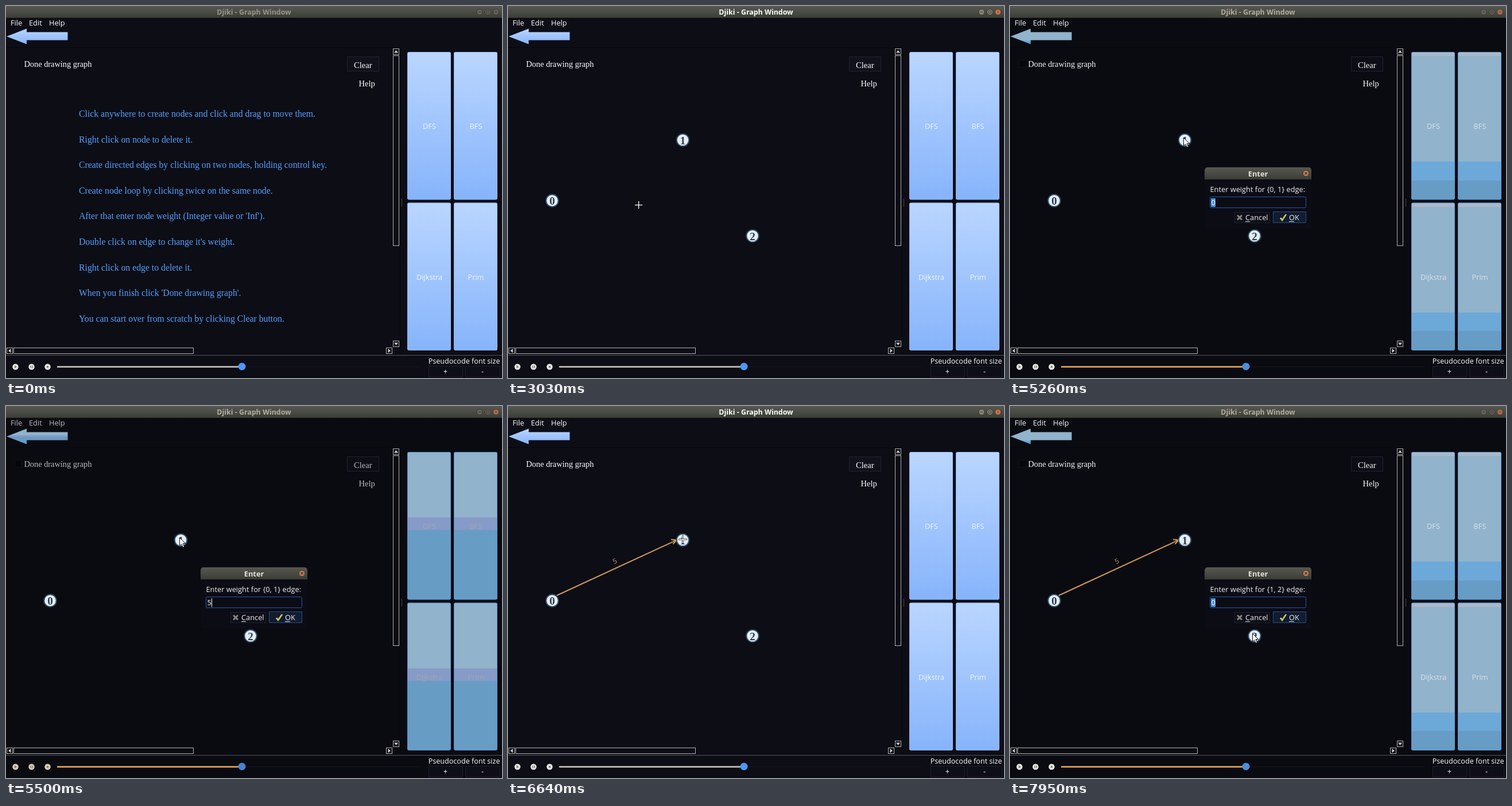
Recreate the animation shown at these times as an HTML page with a canvas. Size 864 by 648 pixels, loop 8 s.

```html
<!DOCTYPE html>
<html lang="en">
<head>
<meta charset="utf-8">
<title>Graph Window</title>
<style>
  html, body { margin: 0; width: 100%; height: 100%; overflow: hidden; background: #0c0d15; }
  canvas { display: block; }
</style>
</head>
<body>
<canvas id="stage" width="864" height="648"></canvas>
<script>
const ctx = document.getElementById('stage').getContext('2d');
const LOOP = 8000;
const SANS = '"Open Sans", "Noto Sans", sans-serif';
const SERIF = '"Liberation Serif", serif';

// Window looks, from fully lit to fully dimmed
const LOOKS = [
  { bg: '#0c0d15', text: '#ffffff', label: '#eef4fc', track: '#b4b0a6', knob: '#4a99fb', media: '#e6e6e2', rim: '#8ebaff',
    bands: [[0, '#bad6ff'], [1, '#86b4fb']] },
  { bg: '#0b0c13', text: '#ffffff', label: '#dde6ee', track: '#c0a27a', knob: '#4a95ea', media: '#e6e6e2', rim: '#6ca9e8',
    bands: [[0, '#a4c3e2'], [1, '#76a8de']] },
  { bg: '#0a0b11', text: '#f6f6f6', label: '#d9e2ea', track: '#cb9450', knob: '#4a8fd8', media: '#e6e6e2', rim: '#5c9ada',
    bands: [[0, '#a9b9c9'], [.027, '#a9b9c9'], [.027, '#91b3cc'], [.743, '#91b3cc'],
            [.743, '#6ca9d9'], [.871, '#6ca9d9'], [.871, '#679cc5'], [1, '#679cc5']] },
  { bg: '#0a0b11', text: '#b9b9bb', label: '#a2a5b2', track: '#cb9450', knob: '#4583d2', media: '#dcccb4', rim: '#5590d2',
    bands: [[0, '#91b3cc'], [.443, '#91b3cc'], [.443, '#869bc7'], [.53, '#869bc7'],
            [.53, '#679cc5'], [1, '#679cc5']] }
];

const HELP = [
  'Click anywhere to create nodes and click and drag to move them.',
  'Right click on node to delete it.',
  'Create directed edges by clicking on two nodes, holding control key.',
  'Create node loop by clicking twice on the same node.',
  "After that enter node weight (Integer value or 'Inf').",
  "Double click on edge to change it's weight.",
  'Right click on edge to delete it.',
  "When you finish click 'Done drawing graph'.",
  'You can start over from scratch by clicking Clear button.'
];

const NODES = [[77, 339, 1290], [304.5, 233.5, 1870], [426, 400.5, 2470]];

// Pointer moves: start, end, Bezier points
const MOVES = [
  [410, 530, [1010, 140], [790, 238], [690, 284], [632, 284]],
  [660, 900, [632, 284], [450, 290], [200, 312], [66, 328]],
  [1320, 1480, [66, 328], [140, 290], [220, 262], [293, 222]],
  [1830, 2070, [293, 222], [330, 280], [378, 335], [415, 389]],
  [2630, 3430, [415, 389], [330, 410], [110, 270], [82, 338]],
  [3930, 4490, [82, 338], [150, 320], [399, 201], [304, 233]],
  [6600, 7240, [304, 233], [304, 205], [370, 380], [424, 400]]
];

function rect(x, y, w, h, fill, stroke) {
  if (fill) { ctx.fillStyle = fill; ctx.fillRect(x, y, w, h); }
  if (stroke) {
    ctx.strokeStyle = stroke;
    ctx.lineWidth = 1;
    ctx.strokeRect(x + .5, y + .5, w - 1, h - 1);
  }
}

function path(points, color, width, close) {
  ctx.beginPath();
  points.forEach(([x, y]) => ctx.lineTo(x, y));
  if (close) ctx.closePath();
  if (width) { ctx.strokeStyle = color; ctx.lineWidth = width; ctx.stroke(); }
  else { ctx.fillStyle = color; ctx.fill(); }
}

function disc(x, y, r, fill, stroke, width = 1) {
  ctx.beginPath();
  ctx.arc(x, y, r, 0, 7);
  ctx.fillStyle = fill;
  ctx.fill();
  if (stroke) { ctx.strokeStyle = stroke; ctx.lineWidth = width; ctx.stroke(); }
}

function text(str, x, y, font, color, align = 'left') {
  ctx.font = font;
  ctx.textAlign = align;
  ctx.fillStyle = color;
  ctx.fillText(str, x, y);
}

const sans = (str, x, y, color, align, size = 12.8) => text(str, x, y, `${size}px ${SANS}`, color, align);
const serif = (str, x, y, color, size = 14.6) => text(str, x, y, `${size}px ${SERIF}`, color);

function shade(y, h, bands) {
  const g = ctx.createLinearGradient(0, y, 0, y + h);
  bands.forEach(([at, color]) => g.addColorStop(at, color));
  return g;
}

const barFill = (y, h) => shade(y, h, [[0, '#56574f'], [.5, '#4a4b44'], [1, '#3b3c36']]);

function titleBar(focus, dim) {
  rect(0, 0, 864, 21, barFill(0, 21));
  rect(0, 20, 864, 1, '#2a2b26');
  const ink = focus ? '#ffffff' : dim ? '#b3afa5' : '#99968d';
  text('Djiki - Graph Window', 432, 15, `bold 12.4px ${SANS}`, ink, 'center');
  const grey = focus ? '#8a867b' : '#66645b';
  const mark = '#3a3a34';
  disc(825, 10.5, 5, grey, mark);
  disc(839.5, 10.5, 5, grey, mark);
  disc(853.5, 10.5, 5, focus ? '#d4794a' : dim ? '#b0714c' : grey, mark);
  rect(822.5, 10, 5, 1, mark);
  rect(837, 8, 5, 5, null, mark);
  cross(853.5, 10.5, 2, mark, 1);
}

function cross(x, y, r, color, width) {
  path([[x - r, y - r], [x + r, y + r]], color, width);
  path([[x + r, y - r], [x - r, y + r]], color, width);
}

function arrowBox(x, y, dx, dy) {
  rect(x, y, 11, 11, '#0a0a10', '#b4b4b4');
  const cx = x + 5.5, cy = y + 5.5;
  path([[cx + dx * 2.5, cy + dy * 2.5],
        [cx - dx * 2 + dy * 3.5, cy - dy * 2 + dx * 3.5],
        [cx - dx * 2 - dy * 3.5, cy - dy * 2 - dx * 3.5]], '#d0d0d0', 0, true);
}

function scrollBars() {
  arrowBox(674, 74, 0, -1);
  rect(674, 86, 11, 332, null, '#b4b4b4');
  arrowBox(674, 583, 0, 1);
  arrowBox(1, 595, -1, 0);
  rect(13, 595, 314, 11, null, '#b4b4b4');
  arrowBox(662, 595, 1, 0);
}

function sideButton(label, x, y, look) {
  const w = 75, h = 256.5;
  ctx.beginPath();
  ctx.roundRect(x, y, w, h, 2);
  ctx.fillStyle = shade(y, h, look.bands);
  ctx.fill();
  ctx.strokeStyle = look.rim;
  ctx.lineWidth = 1;
  ctx.stroke();
  sans(label, x + 38, y + 133.5, look.label, 'center');
}

function bottomBar(look) {
  rect(0, 608, 864, 1, '#55555a');
  rect(411, 628, 310, 1, '#14151f');
  rect(89, 627, 322, 3, look.track);
  disc(411, 628, 6.5, look.knob);
  [16.5, 44.5, 72.5].forEach(x => disc(x, 628.5, 5.2, look.media));
  const ink = '#77756f';
  path([[15, 626], [15, 631], [19, 628.5]], ink, 0, true);
  rect(42.5, 626.5, 1.5, 4, ink);
  rect(45.5, 626.5, 1.5, 4, ink);
  rect(71, 627, 3, 3, ink);
  sans('Pseudocode font size', 860.5, 623, '#ffffff', 'right', 12.6);
  rect(736, 627, 60, 20, '#0d0e17', '#20202c');
  rect(800, 627, 61, 20, '#0d0e17', '#20202c');
  sans('+', 765.5, 641, '#ffffff', 'center');
  sans('-', 830, 641, '#ffffff', 'center');
  rect(0, 647, 864, 1, '#050509');
}

function mainWindow(look, dim, focus) {
  rect(0, 0, 864, 648, look.bg);
  titleBar(focus, dim);
  sans('File', 8, 34, look.text);
  sans('Edit', 40, 34, look.text);
  sans('Help', 75, 34, look.text);
  path([[1, 53], [36, 39.5], [36, 45.5], [107.5, 45.5], [107.5, 59.5], [36, 59.5], [36, 66.5]],
    shade(39, 28, look.bands), 0, true);
  rect(0, 72, 687, 1, '#07070c');
  rect(686, 72, 1, 535, '#07070c');
  if (dim > 1) rect(15, 94, 13, 13, '#06070b', '#111119');
  serif('Done drawing graph', 31.5, 106, look.text, 14.35);
  rect(594, 88, 56, 26, dim ? '#0c0d15' : '#10111b', '#22222e');
  serif('Clear', 606, 107.5, look.text);
  serif('Help', 614.5, 140, look.text);
  scrollBars();
  for (let y = 336; y < 349; y += 2) rect(689, y, 1, 1, '#77777a');
  sideButton('DFS', 699.5, 80.5, look);
  sideButton('BFS', 780.5, 80.5, look);
  sideButton('Dijkstra', 699.5, 343, look);
  sideButton('Prim', 780.5, 343, look);
  bottomBar(look);
}

function edge() {
  const color = '#d19a56';
  path([[85, 330], [293, 233.8]], color, 2);
  path([[284, 232.6], [293.5, 233.6], [287.5, 240.6]], color, 2);
  ctx.save();
  ctx.translate(186, 270);
  ctx.rotate(-.43);
  sans('5', 0, 4.5, color, 'center', 12);
  ctx.restore();
}

function node(x, y, label) {
  disc(x, y, 10.8, '#e4edf5', '#2c4a62', 2);
  text(label, x, y + 7, `bold 19px ${SERIF}`, '#2d3b4a', 'center');
}

function dialog(pair, scale, typed) {
  ctx.save();
  ctx.translate(0, 334);
  ctx.scale(1, scale);
  ctx.translate(0, -334);
  rect(339, 301, 186, 87, '#0b0c14');
  ctx.beginPath();
  ctx.roundRect(339, 281, 186, 21, [5, 5, 0, 0]);
  ctx.fillStyle = barFill(281, 21);
  ctx.fill();
  text('Enter', 432, 297, `bold 12.8px ${SANS}`, '#e6e2d8', 'center');
  disc(515.5, 291.5, 5.2, '#c67d50', '#3a3a34');
  cross(515.5, 291.5, 2, '#3a3a34', 1.2);
  sans(`Enter weight for {${pair}} edge:`, 348.5, 324, '#f0f0f0');
  ctx.beginPath();
  ctx.roundRect(348.5, 332.5, 167, 19, 2);
  ctx.strokeStyle = '#2658a8';
  ctx.lineWidth = 1;
  ctx.stroke();
  if (!typed) rect(350, 335, 8, 15, '#4a8fe4');
  sans(typed ? '5' : '0', 350.5, 347, '#ffffff');
  if (typed) rect(358, 335, 1, 15, '#ffffff');

  rect(391, 359, 62, 19, '#0d0e17', '#22222e');
  cross(400, 368.5, 4, '#85857f', 3);
  sans('Cancel', 410, 373, '#f0f0f0');
  rect(410, 375, 8, 1, '#f0f0f0');
  rect(458, 358, 58, 20, '#111c30', '#2b4c86');
  path([[471, 369], [474, 373], [481, 363]], '#cfc860', 2.6);
  sans('OK', 486, 373, '#f0f0f0');
  rect(486, 375, 9, 1, '#f0f0f0');
  ctx.restore();
}

function pointer(t) {
  const move = MOVES.filter(m => t >= m[0] + 40).pop();
  if (!move) return null;
  const [t0, t1, a, b, c, d] = move;
  const step = Math.floor((t - t0) / 40) * 40;
  const k = Math.min(1, step / (t1 - t0));
  const s = k * k * (3 - 2 * k), r = 1 - s;
  return [0, 1].map(i =>
    r * r * r * a[i] + 3 * r * r * s * b[i] + 3 * r * s * s * c[i] + s * s * s * d[i]);
}

function crosshair(x, y) {
  x = Math.round(x);
  y = Math.round(y);
  rect(x - 7, y - 1, 15, 3, '#0c0d1599');
  rect(x - 1, y - 7, 3, 15, '#0c0d1599');
  rect(x - 6, y, 13, 1.3, '#ffffff');
  rect(x, y - 6, 1.3, 13, '#ffffff');
}

function arrowCursor(x, y) {
  const shape = [[0, 0], [0, 14], [3.2, 11], [5.6, 16.5], [8, 15.4], [5.6, 10.2], [10, 10]]
    .map(([px, py]) => [x + px, y + py]);
  path(shape, '#ffffff', 0, true);
  path(shape, '#101014', 1, true);
}

function dimLevel(t) {
  if (t >= 4980 && t < 5930) {
    if (t >= 5880) return 1;
    if (t >= 5830) return 2;
    if (t >= 5400) return 3;
  } else if (t < 7660) return 0;
  const age = t - (t < 6000 ? 4980 : 7660);
  return age < 60 ? 0 : age < 200 ? 1 : 2;
}

function dialogScale(t) {
  if (t >= 5690 && t < 7660) {
    const left = 1 - Math.min(1, (t - 5690) / 105);
    return left * left;
  }
  const start = t < 7000 ? 4980 : 7660;
  if (t < start) return 0;
  const left = 1 - Math.min(1, (t - start + 15) / 130);
  return 1 - left * left;
}

function draw(t) {
  const dim = dimLevel(t);
  const modal = (t >= 4980 && t < 5830) || t >= 7660;
  mainWindow(LOOKS[dim], dim, t >= 1290 && !modal);
  if (t < 1290) HELP.forEach((line, i) => serif(line, 127, 193 + i * 44.62, '#56a0ff', 15.75));
  if (t >= 5700) edge();
  NODES.forEach(([x, y, born], i) => { if (t >= born) node(x, y, String(i)); });

  const scale = dialogScale(t);
  if (scale > 0) dialog(t < 7000 ? '0, 1' : '1, 2', scale, t >= 5400 && t < 7000);

  const at = pointer(t);
  if (!at) return;
  const [x, y] = at;
  if (x > 686) arrowCursor(x, y);
  else if (modal && (t < 5700 || t >= 7660)) arrowCursor(x - 1.5, y - 3.5);
  else crosshair(x, y);
}

const begin = performance.now();
function tick() {
  draw((performance.now() - begin) % LOOP);
  requestAnimationFrame(tick);
}
tick();
</script>
</body>
</html>
```
